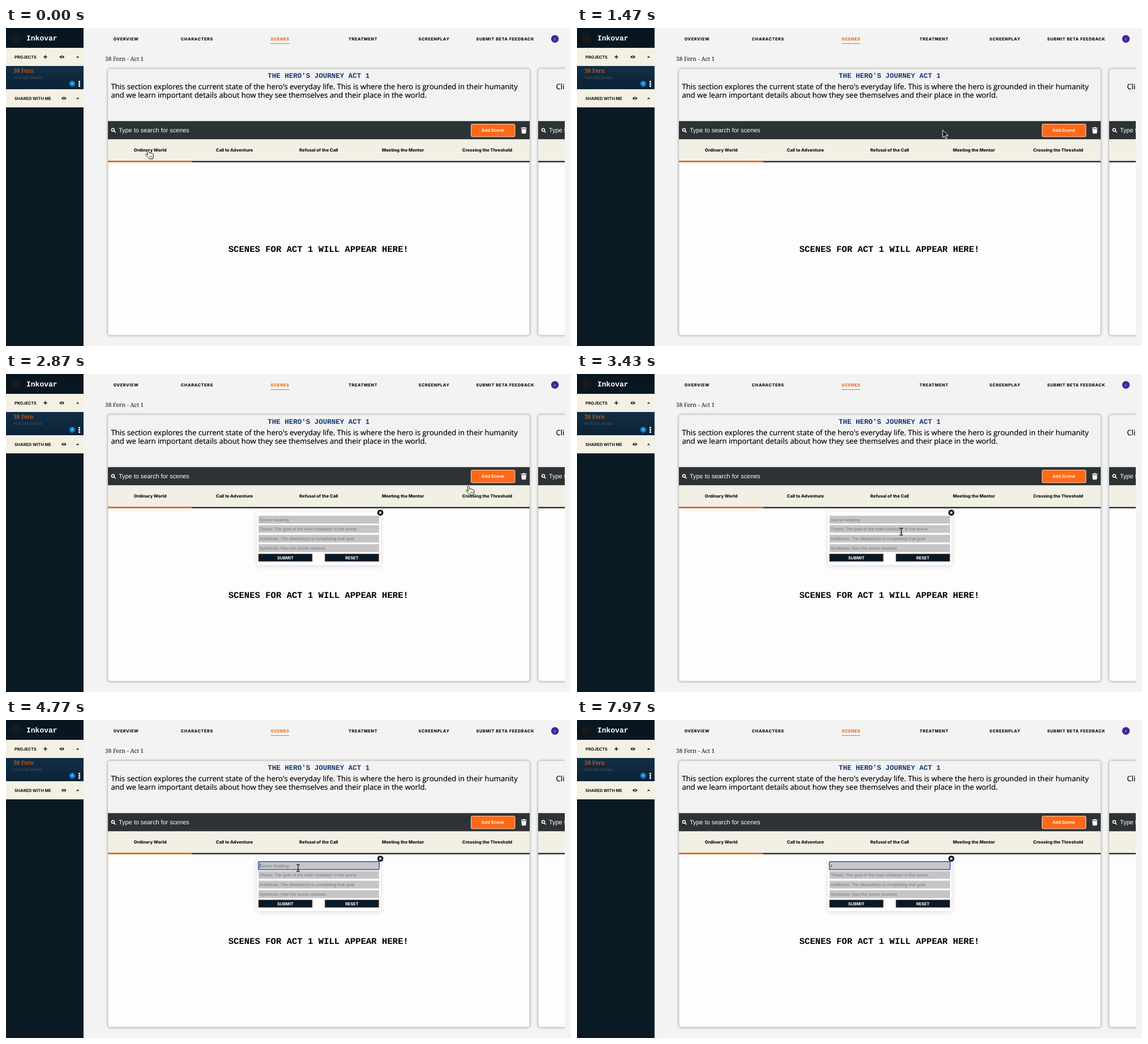
Write an HTML page that moves like this. It is 998 px wide and 561 px high and loops after 8000 ms.

```html
<!DOCTYPE html>
<html lang="en">
<head>
<meta charset="utf-8">
<title>Scene planner</title>
<style>
html, body { margin: 0; width: 100%; height: 100%; overflow: hidden; background: #f3f3f3; }
svg { display: block; width: 100%; height: 100%; text-rendering: geometricPrecision; }
text { font-family: Inter, sans-serif; }
.mid { text-anchor: middle; }
.nav { font-size: 7.3px; font-weight: 800; letter-spacing: .6px; }
.side { font-size: 7.3px; font-weight: 700; fill: #111; }
.tab { font-size: 7.65px; font-weight: 800; }
.copy { font: 13.12px "Open Sans", sans-serif; fill: #000; stroke: #000; stroke-width: .2px; }
.slab { font-family: "Noto Serif", serif; font-size: 10.1px; }
.mono { font-family: "Liberation Mono", monospace; font-weight: 700; }
.search, .field { font-family: "Liberation Sans", sans-serif; }
.search { font-size: 10.9px; fill: #fff; }
.field { font-size: 7.55px; fill: #77777a; }
.button { font-size: 7.4px; font-weight: 700; fill: #fff; }
.line { fill: none; stroke: currentColor; }
.panel { filter: drop-shadow(0 0 2px #0005); }
.popup { filter: drop-shadow(0 2px 4px #0002); }
.pointer { fill: #fff; stroke: #111; stroke-width: 1; stroke-linejoin: round; }
#arrow { fill: #111; stroke: #fff; }
</style>
</head>
<body>
<svg viewBox="0 0 998 561">
  <defs>
    <linearGradient id="navy" x2="0" y2="1">
      <stop stop-color="#122f46"/><stop offset="1" stop-color="#0c2236"/>
    </linearGradient>
    <clipPath id="main"><path d="M137 0H987V561H137Z"/></clipPath>
    <g id="eye">
      <path d="M-4.5 0Q0-5.6 4.5 0Q0 5.6-4.5 0Z" fill="#111"/>
      <circle r="1.9" fill="#f4f0e3"/><circle r="1.1" fill="#111"/>
    </g>
    <path id="chevron" class="line" d="M-2 1L0-1L2 1" stroke-width="1.2"/>
    <g id="card">
      <rect class="panel" x="180" y="72" width="745" height="470" rx="4" fill="#fdfdfd" stroke="#c3c3bd" stroke-width=".8"/>
      <path d="M180.5 164V76q0-3.5 3.5-3.5H921q3.5 0 3.5 3.5V164Z" fill="#f2f2f3"/>
      <path d="M180 164.2H925V196.6H180Z" fill="#2d3234"/>
      <path d="M180.5 196.6H924.5V235H180.5Z" fill="#f2efe4"/>
      <path d="M180 234.5H925V237H180Z" fill="#2d3234"/>
      <g class="line" color="#fff" stroke-width="1.5">
        <circle cx="188.9" cy="179.8" r="2.5"/><path d="M190.8 181.7L193.6 184.5"/>
      </g>
      <text class="search" x="199" y="184.4">Type to search for scenes</text>
    </g>
  </defs>

  <rect width="998" height="561" fill="#f3f3f3"/>

  <rect width="137" height="561" fill="#0a1a25"/>
  <rect width="137" height="35" fill="#081622"/>
  <path d="M0 35H137V67H0ZM0 108H137V140H0Z" fill="#f4f0e3"/>
  <rect y="67" width="137" height="41" fill="url(#navy)"/>
  <circle cx="17" cy="17.5" r="9" fill="#1b1819"/>
  <text class="mono" x="36" y="21.6" font-size="13" fill="#fff">Inkovar</text>
  <text class="side" x="15" y="53.8">PROJECTS</text>
  <text class="side" x="15" y="126.7">SHARED WITH ME</text>
  <path class="line" d="M66.3 51H72.7M69.5 47.8V54.2" color="#111" stroke-width="1.5"/>
  <use href="#eye" x="98.7" y="51"/>
  <use href="#eye" x="102.3" y="124"/>
  <g color="#111"><use href="#chevron" x="126.5" y="51.3"/><use href="#chevron" x="126.5" y="124.3"/></g>
  <text class="slab" x="13" y="79.3" fill="#f26a1b">38 Fern</text>
  <text x="13" y="89.8" font-size="6.1" fill="#4b5661">FEATURE DRAMA</text>
  <circle cx="117" cy="98.3" r="5.3" fill="#087dcc"/>
  <text class="mid" x="117" y="100.4" font-size="5.5" fill="#fff">R</text>
  <path class="line" d="M129.5 94.6h.01m0 3.9h.01m0 3.9h.01" color="#fff" stroke-width="3.3" stroke-linecap="round"/>

  <g class="nav mid" fill="#111">
    <text x="212" y="22.2">OVERVIEW</text>
    <text x="337.4" y="22.2">CHARACTERS</text>
    <text x="484.2" y="22.2" fill="#f26a1b">SCENES</text>
    <text x="630.6" y="22.2">TREATMENT</text>
    <text x="756" y="22.2">SCREENPLAY</text>
    <text x="881.8" y="22.2">SUBMIT BETA FEEDBACK</text>
  </g>
  <path d="M467.5 27H500.5V28H467.5Z" fill="#f26a1b"/>
  <circle cx="969.6" cy="19.3" r="6.7" fill="#4523a0"/>
  <text class="mid" x="969.6" y="21.6" font-size="6.5" fill="#fff">r</text>
  <text class="slab" x="175" y="57.8" fill="#111">38 Fern - Act 1</text>

  <g clip-path="url(#main)">
    <use href="#card"/>
    <use href="#card" x="760"/>
    <text class="copy" x="971.5" y="108">Cli</text>
  </g>
  <text class="mono mid" x="552.2" y="87.6" font-size="12.5" fill="#153a78">THE HERO'S JOURNEY ACT 1</text>
  <text class="copy" x="185.5" y="108">This section explores the current state of the hero's everyday life. This is where the hero is grounded in their humanity</text>
  <text class="copy" x="185.5" y="122.6">and we learn important details about how they see themselves and their place in the world.</text>
  <rect x="821.5" y="169.5" width="77.5" height="22.3" rx="2" fill="#ff6918" stroke="#f8d8c5"/>
  <text class="mid" x="860" y="183.2" font-size="7.7" font-weight="600" fill="#fff">Add Scene</text>
  <path d="M909.6 175.8H912.6L913.4 174.8H915.8L916.6 175.8H919.6V177.3H909.6ZM910.3 178.2H918.9L918.4 185Q918.3 186.2 917.2 186.2H912Q910.9 186.2 910.8 185Z" fill="#fff"/>
  <path d="M180 234.5H329V237H180Z" fill="#f26a1b"/>
  <g class="tab mid" fill="#111">
    <text x="254.7" y="218">Ordinary World</text>
    <text x="403.4" y="218">Call to Adventure</text>
    <text x="552.3" y="218">Refusal of the Call</text>
    <text x="701.2" y="218">Meeting the Mentor</text>
    <text x="850" y="218">Crossing the Threshold</text>
  </g>
  <text class="mono mid" x="551.8" y="394.8" font-size="15.6">SCENES FOR ACT 1 WILL APPEAR HERE!</text>

  <g id="form">
    <rect class="popup" x="443" y="244" width="218.5" height="93" rx="2" fill="#fff"/>
    <path d="M446 250H659V264H446ZM446 266.6H659V280.3H446ZM446 283.4H659V297.2H446ZM446 300.2H659V314H446Z" fill="#c5c4c7"/>
    <text id="heading" class="field" x="448" y="259.7"></text>
    <text class="field" x="448" y="276.4">Thesis: The goal of the main character in the scene</text>
    <text class="field" x="448" y="293.2">Antithesis: The obstacle(s) to completing that goal</text>
    <text class="field" x="448" y="310">Synthesis: How the scene resolves</text>
    <path d="M446 317.3H541V330.7H446ZM563.3 317.3H658.7V330.7H563.3Z" fill="#06192a" stroke="#b9622c" stroke-width=".8"/>
    <g class="button mid">
      <text x="493.5" y="326.7">SUBMIT</text>
      <text x="611" y="326.7">RESET</text>
    </g>
    <circle cx="661.2" cy="244.6" r="5.3" fill="#0a1118"/>
    <path class="line" d="M659.3 242.7l3.8 3.8m0-3.8l-3.8 3.8" color="#fff" stroke-width="1.5"/>
    <rect id="focus" class="line" x="445.6" y="249.8" width="213.6" height="14.2" rx="1.8" color="#2059b8" stroke-width="1.5"/>
    <path id="caret" class="line" d="M0 253V261.3" color="#111" stroke-width=".8"/>
  </g>

  <g id="cursor">
    <g id="hand" class="pointer">
      <path d="M-1.9 1C-2-1 .5-1 1 .8L2 5C3 4 4.6 4 5 5.3 6 4.5 7.3 5 7.5 6.2 8.5 5.6 9.4 6.3 9.4 7.8V10.5C9.4 12.5 8.6 13.2 8.4 14.8H1.8C1 12.8-2.5 10.5-4.3 8.2-5.2 6.8-3.6 5.8-2.4 6.8L-.6 8.2Z"/>
      <path d="M3 9.5V12.5M5 9.3V12.5M7 9.3V12.5" stroke-width=".7"/>
    </g>
    <path id="arrow" class="pointer" d="M0 0V13.2L3.1 10.4L5.4 15.6L7.8 14.6L5.5 9.6H9.6Z"/>
    <g id="beam" class="line" color="#111">
      <path d="M-3-6.2Q0-6.2 0-4.3Q0-6.2 3-6.2M0-5V5M-3 6.4Q0 6.4 0 4.5Q0 6.4 3 6.4M-1.5 2.5H1.5" stroke-width="1.2"/>
    </g>
  </g>
</svg>
<script>
const LOOP = 8000, OPEN = 2670, FOCUS = 4430, TYPED = 7430, BLINK = 515;
// time, x, y of the pointer's hot spot
const path = [
  [0, 251, 216], [930, 251, 216], [1470, 645, 180], [1880, 864.5, 183],
  [2690, 864.5, 183], [3400, 573, 278], [3500, 572, 278],
  [4300, 528, 273], [4420, 516, 261], [LOOP, 516, 261]
];
const el = id => document.getElementById(id);
const show = (id, on) => el(id).setAttribute("visibility", on ? "inherit" : "hidden");
const smooth = p => p * p * (3 - 2 * p);
// the first sweep speeds up, then slows onto the button
const easing = { 930: p => p ** 1.6, 1470: p => 1 - (1 - p) ** 1.8 };

function pointerAt(t) {
  const i = path.findIndex(([end]) => end > t);
  const [t0, x0, y0] = path[i - 1], [t1, x1, y1] = path[i];
  const k = (easing[t0] || smooth)((t - t0) / (t1 - t0));
  return [x0 + (x1 - x0) * k, y0 + (y1 - y0) * k];
}

function pointerKind(x, y, t) {
  const within = (l, top, r, b) => x >= l && x <= r && y >= top && y <= b;
  if (t >= OPEN && within(446, 250, 659, 314)) return "beam";
  return within(821, 169, 899, 192) || within(180, 197, 925, 236) ? "hand" : "arrow";
}

function draw(t) {
  const [x, y] = pointerAt(t), kind = pointerKind(x, y, t), typed = t >= TYPED;
  el("cursor").setAttribute("transform", `translate(${x} ${y})`);
  show("cursor", !typed);
  for (const id of ["hand", "arrow", "beam"]) show(id, !typed && id === kind);

  show("form", t >= OPEN);
  show("focus", t >= FOCUS);
  const since = t - (typed ? TYPED : FOCUS);
  show("caret", since >= 0 && Math.floor(since / BLINK) % 2 === 0);
  el("caret").setAttribute("transform", `translate(${typed ? 450.7 : 448.5} 0)`);
  el("heading").textContent = typed ? "I" : "Scene Heading";
  el("heading").style.fill = typed ? "#111" : "";
}

const start = performance.now();
function tick() {
  draw((performance.now() - start) % LOOP);
  requestAnimationFrame(tick);
}
tick();
</script>
</body>
</html>
```
